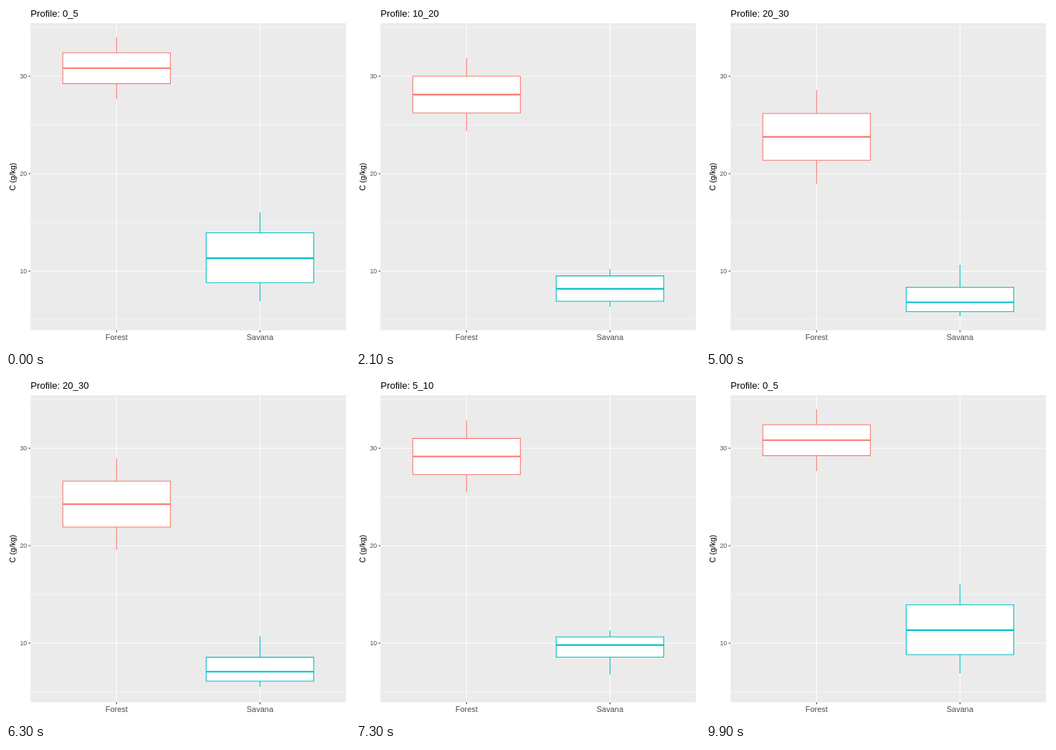
These frames come from a looping animation (480 px wide and 480 px high, 10 s). An HTML page:

```html
<!DOCTYPE html>
<html>
<head>
<meta charset="utf-8">
<style>
  html, body { margin: 0; width: 100%; height: 100%; overflow: hidden; background: #fff; }
  svg { display: block; width: 480px; height: 480px; }
  text { font-family: "Liberation Sans", Arial, sans-serif; }
  .axis { fill: #4d4d4d; }
  path { fill: none; stroke-width: 1.07; }
</style>
</head>
<body>
<svg viewBox="0 0 480 480">
  <rect x="34.2" y="24" width="440.3" height="428.6" fill="#ebebeb"/>
  <path d="M34.2 30H474.5M34.2 166H474.5M34.2 302H474.5M34.2 438H474.5" stroke="#fff" style="stroke-width:.53"/>
  <path d="M34.2 98H474.5M34.2 234H474.5M34.2 370H474.5M154.3 24V452.6M354.4 24V452.6" stroke="#fff"/>
  <g id="boxes"></g>
  <path d="M31.5 98H34.2M31.5 234H34.2M31.5 370H34.2M154.3 452.6V455.3M354.4 452.6V455.3" stroke="#333"/>
  <g class="axis" font-size="8.8" text-anchor="end">
    <text x="29.2" y="101.1">30</text>
    <text x="29.2" y="237.1">20</text>
    <text x="29.2" y="373.1">10</text>
  </g>
  <g class="axis" font-size="11" text-anchor="middle">
    <text x="154.3" y="466">Forest</text>
    <text x="354.4" y="466">Savana</text>
  </g>
  <text transform="translate(13.4 238.3) rotate(-90)" font-size="11" text-anchor="middle">C (g/kg)</text>
  <text id="title" x="34.2" y="15" font-size="13.2"></text>
</svg>
<script>
  // Five-number summaries: max, upper quartile, median, lower quartile, min
  const even = (max, min) => [0, 1, 2, 3, 4].map(i => max + (min - max) * i / 4);
  const states = [
    { name: '0_5', forest: even(34, 27.65), savana: [16.03, 13.93, 11.33, 8.82, 6.91] },
    { name: '10_20', forest: even(30.93, 22.89), savana: [7.65, 7.55, 6.8, 6.07, 6.05] },
    { name: '20_30', forest: even(28.58, 18.97), savana: [10.66, 8.35, 6.8, 5.85, 5.37] },
    { name: '5_10', forest: even(33.24, 26.04), savana: [11.38, 10.85, 10.08, 8.82, 6.91] }
  ];
  // Step at which each state starts to leave, and step at which the next is reached
  const moves = [[12, 25], [38, 50], [62, 74], [87, 99]];

  const boxes = document.getElementById('boxes');
  const title = document.getElementById('title');
  const toY = v => 370 - (v - 10) * 13.6;

  function boxPlot(x, color, stats) {
    const [max, q3, mid, q1, min] = stats.map(v => toY(v).toFixed(2));
    const l = x - 75.05, r = x + 75.05;
    return `<g stroke="${color}">
      <path d="M${x} ${q3}V${max}M${x} ${q1}V${min}"/>
      <path d="M${l} ${q3}H${r}V${q1}H${l}Z" style="fill:#fff"/>
      <path d="M${l} ${mid}H${r}" style="stroke-width:2.13"/></g>`;
  }

  function draw(step) {
    let i = moves.findIndex(m => step < m[1]);
    if (i < 0) i = 3;
    const [start, end] = moves[i];
    const t = Math.min(1, Math.max(0, (step - start) / (end - start)));
    const from = states[i], to = states[(i + 1) % 4];
    const mix = key => from[key].map((v, k) => v + (to[key][k] - v) * t);
    boxes.innerHTML = boxPlot(154.3, '#f8766d', mix('forest')) + boxPlot(354.4, '#00bfc4', mix('savana'));
    title.textContent = 'Profile: ' + (t > 0.5 ? to : from).name;
  }

  const begin = performance.now();
  let last = -1;
  function tick() {
    const step = Math.floor((performance.now() - begin) / 100) % 100;
    if (step !== last) draw(last = step);
    requestAnimationFrame(tick);
  }
  tick();
</script>
</body>
</html>
```
